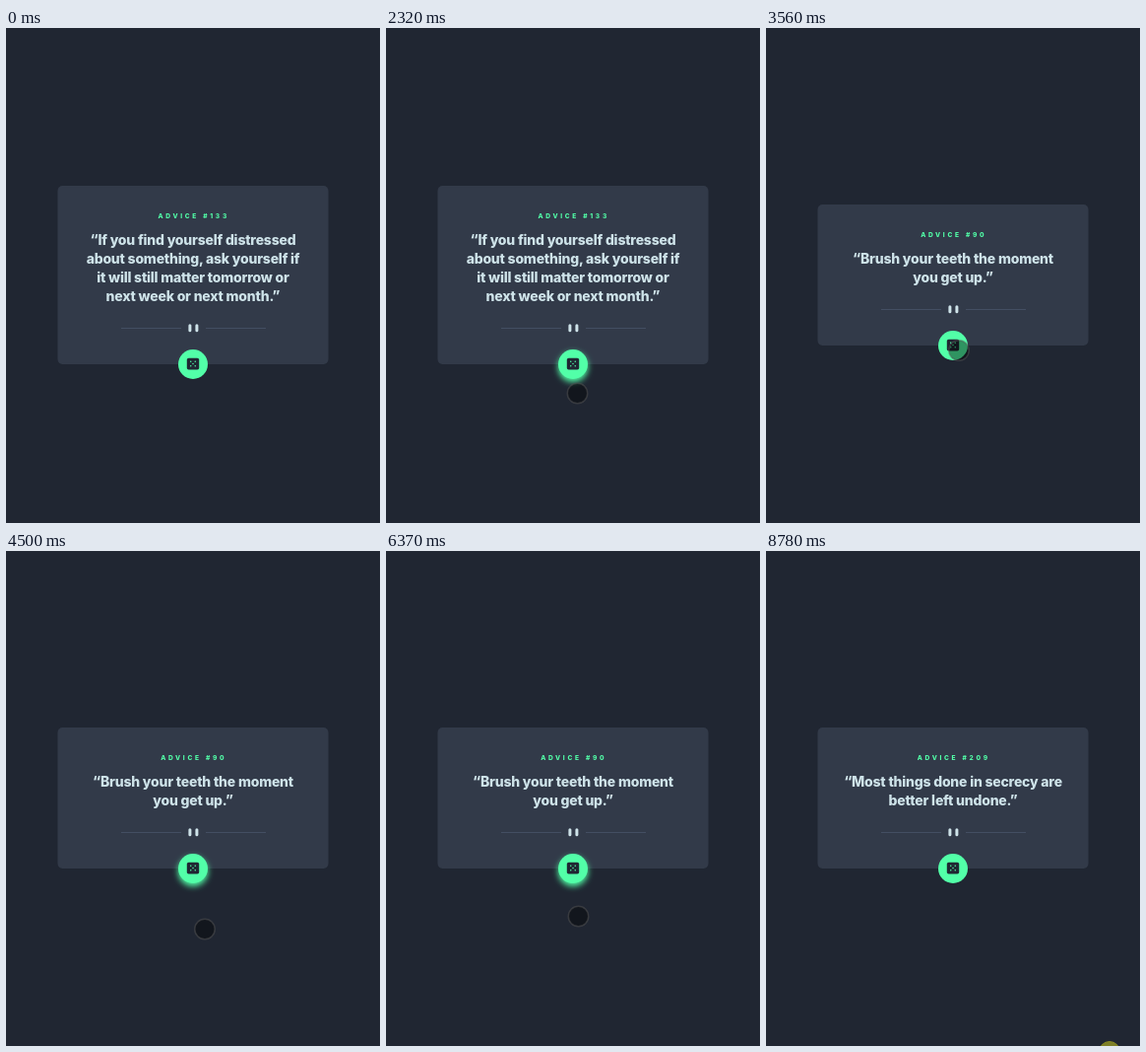
Write an HTML page that moves like this. It is 380 px wide and 502 px high and loops after 8.86 s.

```html
<!DOCTYPE html>
<html lang="en">
<head>
<meta charset="utf-8">
<title>Advice card</title>
<style>
  html, body { margin: 0; width: 100%; height: 100%; overflow: hidden; background: #202632; }
  svg { display: block; width: 380px; height: 502px; }
  text { text-anchor: middle; font-family: Inter, "Open Sans", sans-serif; font-weight: 800; }
  #label { font-size: 6.6px; letter-spacing: 2.7px; fill: #52ffa8; }
  .quote { font-size: 14px; letter-spacing: -.2px; fill: #cee3e9; }
</style>
</head>
<body>
<svg viewBox="0 0 380 502">
  <defs>
    <filter id="blur" x="-60%" y="-60%" width="220%" height="220%">
      <feGaussianBlur stdDeviation="3.2"/>
    </filter>
    <rect id="rule" y="-37" width="61" height=".6" fill="#4f5d74"/>
    <rect id="bar" y="-40.7" width="3" height="8" rx="1.5" fill="#cee3e9"/>
  </defs>
  <rect width="380" height="502" fill="#202632"/>
  <rect id="card" x="52.5" width="275" rx="5" fill="#323a49"/>
  <text id="label" x="190.7"></text>
  <g id="lines"></g>
  <g id="foot">
    <use href="#rule" x="117"/>
    <use href="#rule" x="203"/>
    <use href="#bar" x="185.4"/>
    <use href="#bar" x="192.4"/>
    <circle id="glow" cx="190" cy="3" r="15" fill="#52ffa8" filter="url(#blur)"/>
    <circle cx="190" r="15" fill="#52ffa8"/>
    <rect x="183.8" y="-6.3" width="12.4" height="11.8" rx="1.8" fill="#202733"/>
    <g id="dots" fill="#52ffa8"></g>
  </g>
  <g id="touch">
    <circle r="10.2" fill-opacity=".42"/>
    <circle r="10.2" fill="none" stroke="#555" stroke-opacity=".5" stroke-width="1.5"/>
  </g>
  <circle id="mark" cx="349" cy="508" r="10.5" fill="#7d7f28" stroke="#8a8a22"/>
</svg>
<script>
const LOOP = 8860, STEP = 77.5;
const el = id => document.getElementById(id);

function make(tag, attrs, text = "") {
  const node = document.createElementNS("http://www.w3.org/2000/svg", tag);
  for (const key in attrs) node.setAttribute(key, attrs[key]);
  node.textContent = text;
  return node;
}

const cards = [
  { at: 0, no: 133, lines: ["“If you find yourself distressed", "about something, ask yourself if",
    "it will still matter tomorrow or", "next week or next month.”"] },
  { at: 2780, no: 90, lines: ["“Brush your teeth the moment", "you get up.”"] },
  { at: 6450, no: 209, lines: ["“Most things done in secrecy are", "better left undone.”"] }
];

// Each move eases from the last resting place to (x, y)
const entry = { x: 390, y: 529 };
const over = 327, below = 370.5;
const moves = [
  { from: 290, to: 370, x: 302.5, y: 458.5 },
  { from: 600, to: 680, x: 254.5, y: 445.5 },
  { from: 990, to: 1230, x: 187.5, y: 385 },
  { from: 1300, to: 1700, x: 189, y: 337 },
  { from: 2010, to: 2320, x: 194.5, y: below },
  { from: 2940, to: 3330, x: 196, y: over },
  { from: 4020, to: 4500, x: 202, y: 383.5 },
  { from: 5050, to: 5590, x: 192, y: over },
  { from: 6050, to: 6360, x: 195.5, y: below },
  { from: 7300, to: 7690, x: 192.5, y: over },
  { from: 8000, to: 8160, x: 257.5, y: 473.5 }
];
const shows = t => t >= moves[0].from && t < 8240;

const clamp = x => Math.max(0, Math.min(1, x));
const mix = (a, b, p) => a + (b - a) * p;

function pointer(t) {
  const i = moves.findLastIndex(m => m.from <= t);
  const move = moves[i], last = moves[i - 1] || entry;
  const count = Math.round((move.to - move.from) / STEP) + 1;
  const step = Math.floor((t - move.from + 1) / STEP) + 1;
  const p = Math.sin(clamp(step / count) * Math.PI / 2);
  return [mix(last.x, move.x, p), mix(last.y, move.y, p)];
}

// The button lights up after a tap and fades when the advice changes
const fade = (t, at) => clamp((t - at + 60) / 220);
function glow(t) {
  const first = fade(t, 2010) - fade(t, cards[1].at);
  const second = fade(t, 4020) - fade(t, cards[2].at);
  return first + second;
}

let shown;
function setCard(card) {
  if (card === shown) return;
  shown = card;
  const height = 105 + card.lines.length * 19;
  const top = 250.5 - height / 2, bottom = top + height;
  el("card").setAttribute("y", top);
  el("card").setAttribute("height", height);
  el("label").setAttribute("y", top + 32.5);
  el("label").textContent = "ADVICE #" + card.no;
  el("foot").setAttribute("transform", `translate(0 ${bottom})`);
  el("lines").replaceChildren(...card.lines.map((line, i) =>
    make("text", { class: "quote", x: 190, y: top + 60 + i * 19 }, line)));
}

const toggle = (id, on) => el(id).setAttribute("visibility", on ? "visible" : "hidden");

function draw(t) {
  setCard(cards.findLast(c => c.at <= t));
  el("glow").setAttribute("opacity", glow(t));
  toggle("touch", shows(t));
  if (shows(t)) el("touch").setAttribute("transform", `translate(${pointer(t)})`);
  toggle("mark", t >= 8780);
}

// Five pips: the centre and the four diagonals
for (let i = 0; i < 5; i++) {
  const r = i && 3.2, a = (i + 0.5) * Math.PI / 2;
  el("dots").append(make("circle", { cx: 190 + r * Math.cos(a), cy: r * Math.sin(a) - 0.4, r: 0.75 }));
}

const begin = performance.now();
function tick() {
  draw((performance.now() - begin) % LOOP);
  requestAnimationFrame(tick);
}
tick();
</script>
</body>
</html>
```
